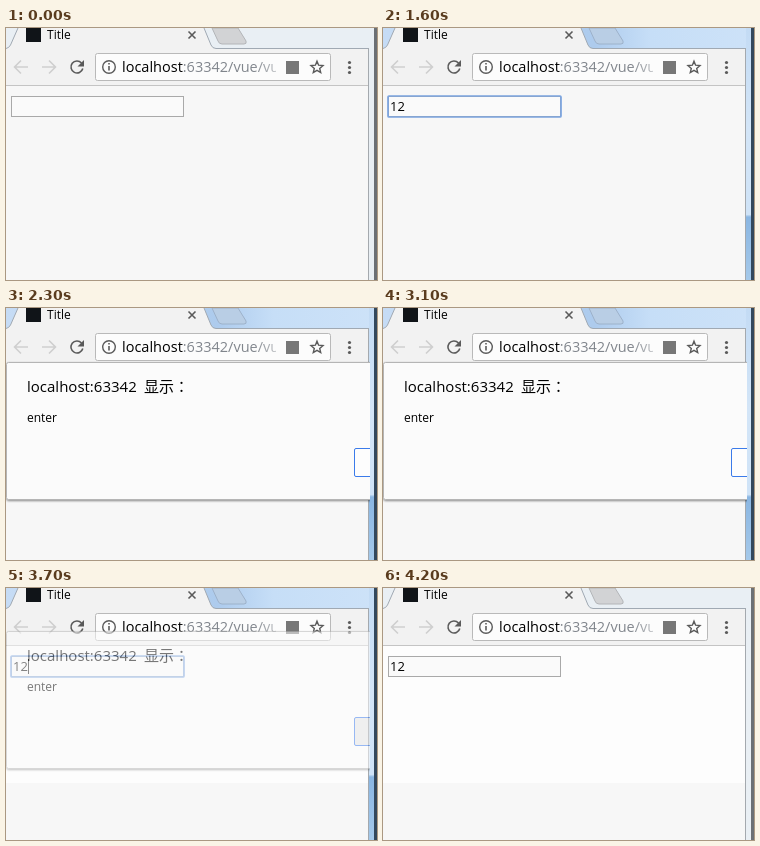
Animation of 371 by 252 pixels, one loop 4300 ms. Source, as an HTML page:

```html
<!DOCTYPE html>
<html lang="zh-CN">
<head>
<meta charset="utf-8">
<title>Title</title>
<style>
  html, body { margin: 0; width: 100%; height: 100%; overflow: hidden; background: #f7f7f7; }
  svg { display: block; font-family: "Open Sans", "Noto Sans", "Noto Sans CJK SC", "Noto Sans CJK", sans-serif; }
  .icon { fill: none; stroke: #5a5a5a; stroke-width: 1.6; }
  .off { stroke: #cfcfcf; }
  .cjk { font-family: "Noto Sans CJK JP", "Noto Sans CJK", sans-serif; }
</style>
</head>
<body>
<svg width="371" height="252" viewBox="0 0 371 252">
  <defs>
    <linearGradient id="blue" x1="0" y1="0" x2="1" y2="0">
      <stop offset="0" stop-color="#c6dcf5"/>
      <stop offset=".57" stop-color="#adcbed"/>
      <stop offset=".72" stop-color="#c6def7"/>
      <stop offset="1" stop-color="#cde2f8"/>
    </linearGradient>
    <linearGradient id="side" x1="0" y1="0" x2="0" y2="1">
      <stop offset="0" stop-color="#c3dbf4"/>
      <stop offset=".4" stop-color="#d3e5f7"/>
      <stop offset=".74" stop-color="#cfe3f7"/>
      <stop offset=".75" stop-color="#8ab6e2"/>
      <stop offset="1" stop-color="#a5c9ea"/>
    </linearGradient>
    <linearGradient id="fade" gradientUnits="userSpaceOnUse" x1="248" y1="0" x2="274" y2="0">
      <stop offset="0" stop-color="#80858c"/>
      <stop offset="1" stop-color="#80858c" stop-opacity=".4"/>
    </linearGradient>
    <clipPath id="urlClip"><rect x="112" y="26" width="158" height="26"/></clipPath>
    <clipPath id="dialogClip"><rect width="364" height="252"/></clipPath>
    <filter id="shadow" x="-5%" y="-10%" width="110%" height="120%">
      <feDropShadow dx="0" dy="1" stdDeviation="1" flood-color="#000" flood-opacity=".45"/>
    </filter>
    <path id="newTab" d="M206 0H232L240 13Q241 16 238 16H216Q213 16 212 13Z"/>
  </defs>

  <!-- window frame, inactive then active -->
  <rect width="371" height="252" fill="#e9eff4"/>
  <rect x="368" width="3" height="252" fill="#6b7075"/>
  <use href="#newTab" fill="#d2d3d5" stroke="#b3b5b8"/>
  <g id="active">
    <rect width="371" height="21" fill="url(#blue)"/>
    <rect x="363" width="5" height="252" fill="url(#side)"/>
    <rect x="368" width="3" height="252" fill="#33485c"/>
    <use href="#newTab" fill="#b9cee5" stroke="#9db2ca"/>
  </g>

  <!-- tab and toolbar -->
  <path d="M0 20.5Q3 20 4.5 17L12 0H198L205 17Q206.5 20.5 210 20.5H362V57H0Z" fill="#f2f2f2"/>
  <path d="M0 20.5Q3 20 4.5 17L12 0M198 0L205 17Q206.5 20.5 210 20.5H362" fill="none" stroke="#a0a9b3"/>
  <rect x="20" y="0" width="15" height="14" fill="#101418"/>
  <text x="41" y="11" font-size="12">Title</text>
  <path class="icon" d="M182.500 3.500l7 7m0-7l-7 7"/>
  <path class="icon off" d="M22 39H9M15 32.500L8.500 39L15 45.500M36 39H49M43 32.500L49.500 39L43 45.500"/>
  <path class="icon" stroke-width="2" d="M75.500 35A6 6 0 1 0 76.800 40.500"/>
  <path d="M78 32V38.500H71.500Z" fill="#5a5a5a"/>
  <rect x="89.500" y="25.500" width="235" height="27" rx="2" fill="#fcfcfc" stroke="#b9b9b9"/>
  <circle class="icon" cx="103" cy="39" r="6.300" style="stroke-width:1.400"/>
  <path class="icon" d="M103 35v1.600M103 38v4.500"/>
  <text x="116" y="44" font-size="14.5" clip-path="url(#urlClip)">localhost<tspan fill="url(#fade)">:63342/vue/vue</tspan></text>
  <rect x="280" y="33" width="13" height="13" fill="#777"/>
  <path class="icon" id="star" style="stroke-width:1.400"/>
  <g fill="#5a5a5a"><circle cx="343.500" cy="34.500" r="1.600"/><circle cx="343.500" cy="39.500" r="1.600"/><circle cx="343.500" cy="44.500" r="1.600"/></g>

  <!-- page -->
  <rect y="57" width="362" height="195" fill="#f7f7f7"/>
  <rect id="patch" y="58" width="362" height="137" fill="#fdfdfd"/>
  <path d="M0 57.500H362" stroke="#c4c4c4"/>
  <path d="M362.500 20V252" stroke="#a4a9ae"/>
  <rect x="5.500" y="68.500" width="172" height="20" fill="#fafafa" stroke="#a9a9a9"/>
  <rect id="ring" x="5" y="68" width="173" height="21" rx="1" fill="none" stroke="#7ba4e0" stroke-width="1.700"/>
  <text id="typed" x="7" y="83" font-size="13"></text>
  <rect id="caret" y="71" width="1" height="15" fill="#111"/>

  <!-- alert -->
  <g clip-path="url(#dialogClip)">
    <g id="dialog">
      <rect x=".5" y="54.500" width="390" height="137" rx="2" fill="#fbfbfb" stroke="#b5b5b5" filter="url(#shadow)"/>
      <text x="21" y="84" font-size="15">localhost:63342</text>
      <text x="138" y="84" font-size="15" class="cjk" lang="ja">显示：</text>
      <text x="21" y="114" font-size="12">enter</text>
      <rect id="button" x="348.500" y="140.500" width="60" height="28" rx="1.500" stroke="#3b7bea"/>
    </g>
  </g>
</svg>
<script>
const LOOP = 4300;
const base = { active: 0, text: "", caret: 0, dialog: 0, lift: 0, pressed: 0, patch: 0 };
// Each step keeps everything it does not change.
const changes = [
  [0, {}],
  [400, { active: 1, caret: 1 }],
  [900, { text: "1" }],
  [1100, { text: "12" }],
  [1600, { caret: 0 }],
  [2000, { caret: 1 }],
  [2200, { dialog: 0.4, lift: 14 }],
  [2300, { dialog: 1, lift: 0 }],
  [3500, { pressed: 1 }],
  [3700, { dialog: 0.52, lift: 11, patch: 1 }],
  [3800, { dialog: 0 }],
  [4100, { active: 0.45, caret: 0 }],
  [4200, { active: 0 }]
];
let last = base;
const steps = changes.map(([at, change]) => ({ at, state: last = { ...last, ...change } }));

const el = id => document.getElementById(id);
const set = (id, attrs) => Object.entries(attrs).forEach(([k, v]) => el(id).setAttribute(k, v));

const star = Array.from({ length: 10 }, (_, i) => {
  const r = i % 2 ? 2.8 : 6.3, a = i * Math.PI / 5;
  return [311 + r * Math.sin(a), 39.5 - r * Math.cos(a)].map(v => v.toFixed(1)).join(" ");
});
set("star", { d: `M${star.join("L")}Z` });

let shown;
function draw(s) {
  set("active", { opacity: s.active });
  set("ring", { opacity: s.active === 1 ? 1 : 0 });
  set("patch", { opacity: s.patch });
  el("typed").textContent = s.text;
  set("caret", { x: [7, 14, 22][s.text.length], opacity: s.caret });
  set("dialog", { opacity: s.dialog, transform: `translate(0 ${-s.lift})` });
  set("button", { fill: s.pressed ? "#e4e4e4" : "#fdfdfd" });
}

const start = performance.now();
function tick() {
  const t = (performance.now() - start) % LOOP;
  const step = steps.findLast(s => s.at <= t);
  if (step !== shown) draw((shown = step).state);
  requestAnimationFrame(tick);
}
tick();
</script>
</body>
</html>
```
